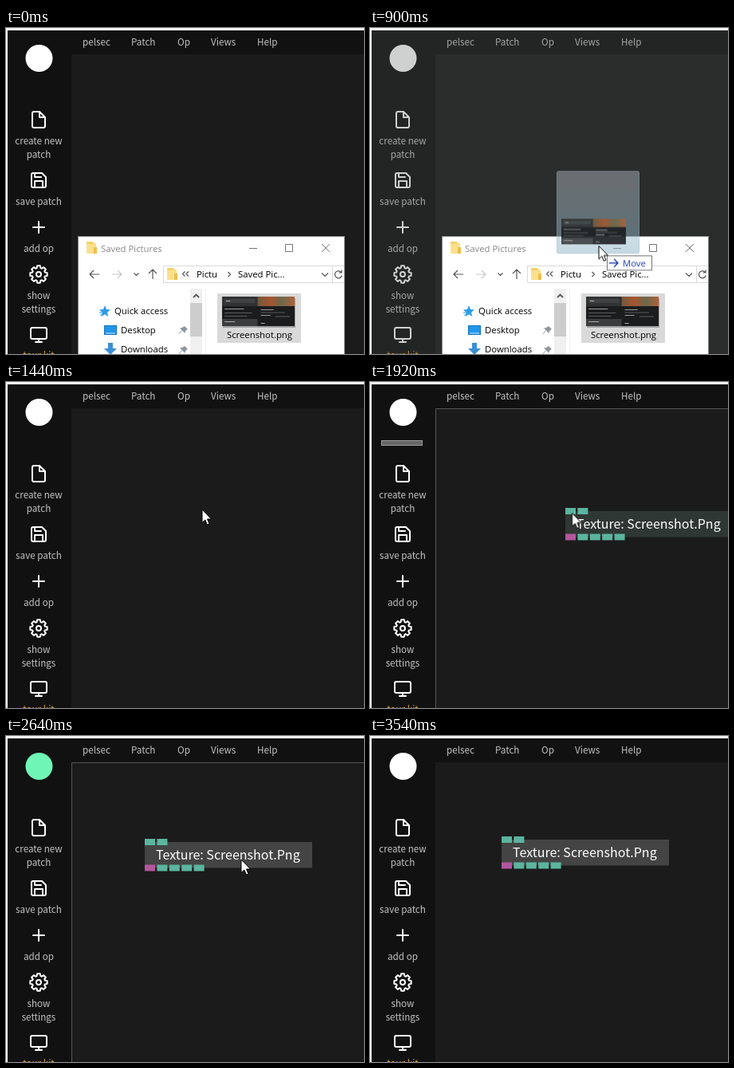
These frames come from a looping animation (449x409 px, 3.6 s). An HTML page:

```html
<!DOCTYPE html>
<html lang="en">
<head>
<meta charset="utf-8">
<title>Drag a picture into the patch</title>
<style>
  html, body { margin: 0; width: 100%; height: 100%; overflow: hidden; background: #fff; }
  svg.stage { display: block; width: 449px; height: 409px; }
  text { white-space: pre; }
  .app { font: 11.66px "Noto Sans CJK JP", "Noto Sans CJK SC", "Noto Sans CJK", sans-serif; fill: #c4c4c4; }
  .side { text-anchor: middle; }
  .icons { fill: none; stroke: #fff; stroke-width: 2; stroke-linecap: round; stroke-linejoin: round; }
  .win { font: 11.35px "Open Sans", "Noto Sans", sans-serif; }
  .line { fill: none; stroke: #555; stroke-width: 1.2; }
  .title { font: 16px "Noto Sans CJK JP", "Noto Sans CJK SC", "Noto Sans CJK", sans-serif; fill: #fff; }

  /* Everything moves on a 60 ms beat: 1.667% of the loop */
  .a { animation: 3.6s step-end infinite; }
  #cursor { animation-name: cursor; }
  #ghost { animation-name: ghost; }
  #ghostPic { animation-name: ghostPic; }
  #tip { animation-name: tip; }
  #win { animation-name: win; }
  #tile { animation-name: tile; }
  #dim { animation-name: dim; }
  #bar { animation-name: bar; }
  #logo { animation-name: logo; }
  #focus { animation-name: focus; }
  #op { animation-name: op; }
  #opShow { animation-name: opShow; }
  #opBody { animation-name: opBody; }

  @keyframes cursor {
    0% { transform: translate(456px, 191px); }
    5% { transform: translate(444px, 191px); animation-timing-function: steps(2); }
    8.33% { transform: translate(420px, 232px); animation-timing-function: steps(4); }
    15% { transform: translate(328px, 343px); animation-timing-function: steps(2); }
    18.33% { transform: translate(318px, 351px); }
    20% { transform: translate(318px, 351px); animation-timing-function: steps(2); }
    23.33% { transform: translate(302px, 312px); animation-timing-function: steps(3); }
    28.33% { transform: translate(257px, 196px); animation-timing-function: steps(2); }
    31.66% { transform: translate(246px, 160px); }
    53.33% { transform: translate(253.5px, 164.5px); animation-timing-function: steps(5); }
    61.66% { transform: translate(366px, 184px); }
    63.33% { transform: translate(366px, 184px); animation-timing-function: steps(2); }
    66.66% { transform: translate(340px, 177px); animation-timing-function: steps(3); }
    71.66% { transform: translate(302px, 158px); }
    73.33% { transform: translate(295px, 155px); animation-timing-function: steps(2); }
    76.66% { transform: translate(286px, 152px); }
    81.66% { transform: translate(295px, 149px); }
    83.33% { transform: translate(305px, 146px); animation-timing-function: steps(5); }
    91.66%, 100% { transform: translate(456px, 37px); }
  }
  @keyframes op {
    0% { transform: translate(245px, 162px); }
    63.33% { transform: translate(245px, 162px); animation-timing-function: steps(2); }
    66.66% { transform: translate(219px, 155px); animation-timing-function: steps(3); }
    71.66% { transform: translate(181px, 136px); }
    73.33% { transform: translate(174px, 133px); animation-timing-function: steps(2); }
    76.66%, 100% { transform: translate(165px, 130px); }
  }
  @keyframes opShow { 0% { opacity: 0; } 48.33%, 100% { opacity: 1; } }
  @keyframes opBody {
    0% { fill: #1f2b27; }
    48.33% { fill: #1f2b27; animation-timing-function: steps(3); }
    53.33% { fill: #2f3734; animation-timing-function: steps(4); }
    60%, 100% { fill: #444; }
  }
  @keyframes ghost {
    0% { opacity: 0; transform: translate(0, 7px); }
    20% { opacity: .7; transform: translate(0, 7px); }
    21.66% { opacity: .85; transform: none; }
    23.33% { opacity: 1; transform: none; }
    40%, 100% { opacity: 0; transform: none; }
  }
  @keyframes ghostPic { 0% { opacity: 0; } 21.66% { opacity: .4; } 23.33%, 100% { opacity: .88; } }
  @keyframes tip { 0% { opacity: 0; } 25% { opacity: 1; } 40%, 100% { opacity: 0; } }
  @keyframes dim { 0% { opacity: 0; } 25% { opacity: 1; } 40%, 100% { opacity: 0; } }
  @keyframes win { 0% { opacity: 1; } 40% { opacity: 0; } 100% { opacity: 0; } }
  @keyframes tile { 0% { fill: #d9d9d9; } 15% { fill: #cce8ff; } 25%, 100% { fill: #d9d9d9; } }
  @keyframes bar { 0% { opacity: 0; } 43.33% { opacity: 1; } 56.66%, 100% { opacity: 0; } }
  @keyframes focus { 0% { opacity: 0; } 48.33% { opacity: 1; } 98.33%, 100% { opacity: 0; } }
  @keyframes logo {
    0% { fill: #fff; }
    65% { fill: #fff; animation-timing-function: steps(5); }
    73.33% { fill: #6ff5b5; }
    75% { fill: #6ff5b5; animation-timing-function: steps(4); }
    81.66%, 100% { fill: #fff; }
  }
</style>
</head>
<body>
<svg class="stage" viewBox="0 0 449 409">
  <defs>
    <linearGradient id="glass" x2="0" y2="1">
      <stop stop-color="#c8d2d7" stop-opacity=".4"/>
      <stop offset="1" stop-color="#8cb4c8" stop-opacity=".5"/>
    </linearGradient>
    <linearGradient id="photo">
      <stop stop-color="#6f5a3c"/>
      <stop offset=".35" stop-color="#a8552f"/>
      <stop offset=".65" stop-color="#6b6a4c"/>
      <stop offset="1" stop-color="#b0603a"/>
    </linearGradient>
    <symbol id="pic" viewBox="0 0 90 37" preserveAspectRatio="none">
      <rect width="90" height="37" fill="#1b1c1d"/>
      <rect width="44" height="12" fill="#303233"/>
      <rect x="3" y="3" width="38" height="5" rx="1" fill="#3f4243"/>
      <path d="M5 5.5h5" stroke="#bbb"/>
      <rect x="44" width="46" height="12" fill="url(#photo)"/>
      <path d="M3 15.5h24M48 16.5h16M48 23.5h12" stroke="#999" stroke-width="1.2"/>
      <path d="M3 20.5h34M3 24.5h28M48 20h30M66 25h18" stroke="#5a5d5f"/>
      <rect y="28" width="44" height="9" fill="#3a3c3d"/>
      <path d="M3 31.5h13M48 33.5h5" stroke="#aaa"/>
    </symbol>
    <g id="folder">
      <path d="M0 1h8l1 2h3v13H0z" fill="#f5d068"/>
      <path d="M0 4h7l5-1v13H0z" fill="#fbe08d"/>
      <path d="M9 8h4v8H9z" fill="#eebf4a"/>
    </g>
    <g id="pin" fill="#8e979e">
      <path d="M2-5l4 4-1.2.6-2 2.1-.3 2.3L-4-2.5l2.300-.3L.9-4.200z"/>
      <path d="M-1.500.6L-5 4.800" stroke="#8e979e"/>
    </g>
  </defs>

  <rect width="449" height="409" fill="#f6f8f7"/>
  <rect x="2" y="3" width="447" height="406" fill="#111"/>
  <rect x="82" y="33" width="367" height="376" fill="#1b1b1b"/>
  <path id="focus" class="a" d="M82.500 409V33.500H449" fill="none" stroke="#585555"/>

  <g class="app">
    <text x="96" y="22">pelsec</text>
    <text x="157" y="22">Patch</text>
    <text x="215" y="22">Op</text>
    <text x="257" y="22">Views</text>
    <text x="315" y="22">Help</text>
    <g class="side">
      <text x="41" y="146">create new</text>
      <text x="41" y="163">patch</text>
      <text x="41" y="222">save patch</text>
      <text x="41" y="281">add op</text>
      <text x="41" y="340">show</text>
      <text x="41" y="357">settings</text>
      <text x="41" y="415" fill="#d9a536">tour kit</text>
    </g>
  </g>
  <circle id="logo" class="a" cx="41.500" cy="38" r="17" fill="#fff"/>
  <rect id="bar" class="a" x="14.500" y="73.500" width="51" height="6" fill="#666" stroke="#999"/>

  <g class="icons">
    <path transform="translate(29 103)" d="M13 2H6a2 2 0 0 0-2 2v16a2 2 0 0 0 2 2h12a2 2 0 0 0 2-2V9zM13 2v7h7"/>
    <path transform="translate(29 179)" d="M19 21H5a2 2 0 0 1-2-2V5a2 2 0 0 1 2-2h11l5 5v11a2 2 0 0 1-2 2zM17 21v-8H7v8M7 3v5h8"/>
    <path transform="translate(29 238)" d="M12 5v14M5 12h14"/>
    <g transform="translate(41 309)">
      <circle r="3"/>
      <path id="gear"/>
    </g>
    <path transform="translate(29 373)" d="M4 3h16a2 2 0 0 1 2 2v10a2 2 0 0 1-2 2H4a2 2 0 0 1-2-2V5a2 2 0 0 1 2-2zM8 21h8M12 17v4"/>
  </g>

  <rect id="dim" class="a" x="2" y="3" width="447" height="406" fill="#555858" fill-opacity=".28" opacity="0"/>

  <g id="win" class="a win">
    <rect x="90.500" y="261.500" width="334" height="160" fill="#fff" stroke="#8a8a8a"/>
    <use href="#folder" x="101" y="267"/>
    <text x="119" y="281" fill="#888">Saved Pictures</text>
    <path d="M305 276.500h10M350.500 271.500h9v9h-9zM396 271l10 10M406 271l-10 10" fill="none" stroke="#777"/>

    <path class="line" d="M117 309h-12m5-5l-5 5 5 5M184 315v-12m-5 5l5-5 5 5" stroke-width="1.600"/>
    <path class="line" d="M133 309h12m-5-5l5 5-5 5" style="stroke:#c8c8c8"/>
    <path class="line" d="M160.500 307.500l3 3 3-3M278.500 306l3 3-3 3M396 307.500l4 4 4-4"/>
    <path d="M424 298.500H197.500v21H424M409.500 298v22" fill="none" stroke="#d9d9d9"/>
    <use href="#folder" x="202" y="300"/>
    <path class="line" d="M224.500 305.500l-3 3 3 3M229 305.500l-3 3 3 3"/>
    <text x="239" y="313">Pictu</text>
    <text x="291" y="313">Saved Pic...</text>
    <path class="line" d="M420.500 306.500a4.500 4.500 0 1 0 .8 4M421 303.500v3.500h-3.500"/>

    <path d="M124 348l2 5 5 .4-4 3.400 1.300 5.200-4.300-2.800-4.500 2.800 1.300-5.200-4-3.400 5.200-.4z" fill="#2f9be8"/>
    <path d="M117 357h4M118 360h3" stroke="#2f9be8"/>
    <text x="136" y="359">Quick access</text>
    <rect x="123.500" y="373.500" width="15" height="11" fill="#2196e8" stroke="#1473bd"/>
    <path d="M125 383h12" stroke="#cfeaff"/>
    <text x="144" y="383">Desktop</text>
    <path d="M128 395h6v7h5l-8 8-8-8h5z" fill="#3c8fd6"/>
    <text x="144" y="407">Downloads</text>
    <use href="#pin" x="222" y="379"/>
    <use href="#pin" x="222" y="404"/>

    <rect x="231" y="327" width="15" height="82" fill="#f0f0f0"/>
    <rect x="231" y="345" width="15" height="42" fill="#cdcdcd"/>
    <path class="line" d="M235 338l3.500-3.500 3.500 3.500" style="stroke-width:1.800"/>
    <path d="M250.500 327v82" stroke="#eee"/>

    <rect id="tile" class="a" x="265" y="333" width="105" height="62" fill="#d9d9d9"/>
    <rect x="272" y="339" width="91" height="37" fill="#000" opacity=".25"/>
    <use href="#pic" x="271" y="337" width="91" height="37"/>
    <text x="318" y="389" text-anchor="middle">Screenshot.png</text>
  </g>

  <g id="opShow" class="a" opacity="0">
    <g id="op" class="a">
      <rect id="opBody" class="a" width="210" height="32.500" fill="#444"/>
      <g id="ports" fill="#5bb59f"></g>
      <text class="title" x="14" y="22">Texture: Screenshot.Png</text>
    </g>
  </g>

  <g id="cursor" class="a">
    <g id="ghost" class="a" opacity="0">
      <rect x="-52.500" y="-93.500" width="103" height="103" rx="2" fill="url(#glass)" stroke="#8fb4c8" stroke-opacity=".5"/>
      <use id="ghostPic" class="a" href="#pic" x="-47" y="-34" width="81" height="32"/>
    </g>
    <g id="tip" class="a win" opacity="0">
      <rect x="10.500" y="12.500" width="56" height="18" fill="#fff" stroke="#777"/>
      <path d="M13 21.500h11m-5-5l5 5-5 5" fill="none" stroke="#1c3faa" stroke-width="1.400"/>
      <text x="30" y="26" fill="#1c3faa">Move</text>
    </g>
    <path d="M0 0V16.500L3.800 13l2.500 6 2.700-1.100L6.500 12H11.500z" fill="#fff" stroke="#000"/>
  </g>
</svg>
<script>
  // Eight-toothed settings wheel
  const polar = (r, deg) => {
    const a = deg * Math.PI / 180;
    return (r * Math.cos(a)).toFixed(2) + " " + (r * Math.sin(a)).toFixed(2);
  };
  const rim = [];
  for (let i = 0; i < 8; i++) {
    const mid = i * 45;
    rim.push(polar(8.2, mid - 17), polar(10.8, mid - 10), polar(10.8, mid + 10), polar(8.2, mid + 17));
  }
  document.getElementById("gear").setAttribute("d", "M" + rim.join("L") + "Z");

  // Two inputs above, five outputs below
  const ports = document.getElementById("ports");
  const addPort = (i, y, fill) => {
    const port = document.createElementNS("http://www.w3.org/2000/svg", "rect");
    const box = { x: i * 15.4, y, width: 13, height: 8 };
    for (const key in box) port.setAttribute(key, box[key]);
    if (fill) port.setAttribute("fill", fill);
    ports.append(port);
  };
  for (let i = 0; i < 2; i++) addPort(i, -4);
  for (let i = 0; i < 5; i++) addPort(i, 28.5, i ? "" : "#b3579d");
</script>
</body>
</html>
```
